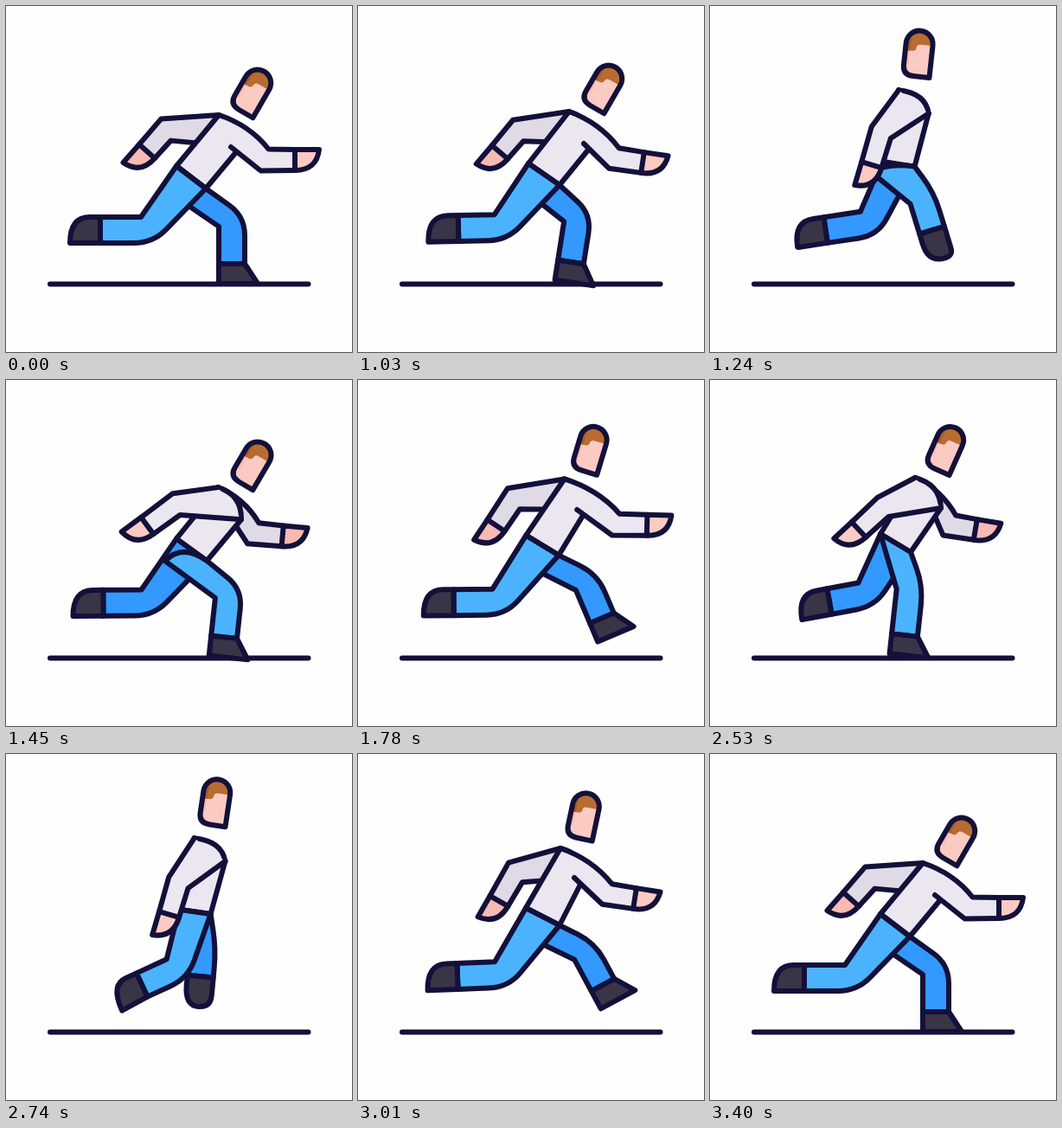
These frames come from a looping animation (400x400 px, 3430 ms). An HTML page with a canvas:

```html
<!DOCTYPE html>
<html lang="en">
<head>
<meta charset="utf-8">
<title>Runner</title>
<style>
  html, body { margin: 0; width: 100%; height: 100%; overflow: hidden; background: #fefefe; }
  canvas { display: block; width: 100%; height: 100%; }
</style>
</head>
<body>
<canvas id="stage" width="400" height="400"></canvas>
<script>
const ctx = document.getElementById('stage').getContext('2d');
const LOOP = 3430, HOLD = 1000, STEP = 30;
const INK = '#13103a', SHOE = '#3a3447';
const NEAR = { leg: '#4bb3fd', shirt: '#ebe6f0', skin: '#fbcac2' };
const FAR = { leg: '#3399fe', shirt: '#dfdae6', skin: '#f8bab2' };

// running time (ms) -> stride count, slowing down at the end
const PACE = [[0, 0], [30, .06], [450, 1.036], [1110, 2.5], [1530, 3.22], [2010, 3.7], [2160, 3.89], [2400, 4]];

// stride phase -> knee, ankle, shoe shape (1 flat, 0 trailing, -1 rounded)
const LEG = [
  [0, 261, 249, 261, 298, 1],
  [.06, 254, 245, 246, 296, 1],
  [.22, 231, 240, 225, 295, 1],
  [.5, 191, 250, 144, 262, 0],
  [.7, 166, 255, 115, 257, 0],
  [1, 163, 259, 109, 259, 0],
  [1.06, 165, 256, 116, 257, 0],
  [1.22, 181, 248, 138, 256, 0],
  [1.5, 237, 223, 242, 258, -1],
  [1.7, 262, 228, 283, 267, 1]
];

// stride phase -> elbow, wrist
const ARM = [
  [0, 299, 178, 334, 178],
  [.06, 296, 176, 329, 181],
  [.22, 286, 168, 316, 173],
  [.5, 206, 150, 201, 186],
  [.7, 189, 137, 163, 170],
  [1, 197, 143, 163, 168],
  [1.06, 197, 144, 164, 169],
  [1.22, 200, 147, 172, 173],
  [1.5, 206, 150, 201, 186],
  [1.7, 288, 162, 320, 167]
];

// stride phase -> neck, chest, waist back, waist front, head centre, head tilt
const BODY = [
  [0, 246, 126, 271, 163, 197, 185, 231, 211, 285, 99, 30],
  [.06, 244, 122, 272, 159, 197, 182, 233, 207, 284, 94, 30],
  [.22, 237, 113, 267, 148, 197, 178, 232, 199, 273, 80, 24],
  [.5, 216, 96, 252, 122, 200, 180, 237, 184, 239, 54, 6.5],
  [.7, 234, 109, 261, 143, 194, 178, 233, 198, 261, 72, 12]
];

const clamp = v => Math.max(0, Math.min(1, v));
const mix = (a, b, t) => [a[0] + (b[0] - a[0]) * t, a[1] + (b[1] - a[1]) * t];
const add = (p, v, k = 1) => [p[0] + v[0] * k, p[1] + v[1] * k];
const unit = (a, b) => {
  const x = b[0] - a[0], y = b[1] - a[1], l = Math.hypot(x, y) || 1;
  return [x / l, y / l];
};
const front = d => [d[1], -d[0]];

// smooth curve through the rows; wraps around when a period is given
function sample(rows, x, period) {
  const n = rows.length;
  if (period) x = ((x % period) + period) % period;
  const row = i => {
    if (!period) return rows[Math.max(0, Math.min(n - 1, i))];
    const turn = Math.floor(i / n), r = rows[i - turn * n];
    return [r[0] + turn * period, ...r.slice(1)];
  };
  let i = 0;
  while (i < n - 1 && rows[i + 1][0] <= x) i++;
  if (!period && i === n - 1) return rows[i].slice(1);
  const [a, b, c, d] = [row(i - 1), row(i), row(i + 1), row(i + 2)];
  const h = c[0] - b[0], s = (x - b[0]) / h, r = 1 - s;
  return b.slice(1).map((v, j) => {
    const k = j + 1;
    const m0 = (c[k] - a[k]) / (c[0] - a[0]), m1 = (d[k] - b[k]) / (d[0] - b[0]);
    return v * (1 + 2 * s) * r * r + c[k] * s * s * (3 - 2 * s) + h * (m0 * s * r * r - m1 * s * s * r);
  });
}

// path items: [x, y] is a line, [cx, cy, x, y] a curve
function trace(items, move = true) {
  items.forEach((p, i) => {
    if (p.length === 4) ctx.quadraticCurveTo(...p);
    else if (i === 0 && move) ctx.moveTo(...p);
    else ctx.lineTo(...p);
  });
}

function shape(items, fill) {
  ctx.beginPath();
  trace(items);
  ctx.closePath();
  ctx.fillStyle = fill;
  ctx.fill();
  ctx.stroke();
}

function line(items) {
  ctx.beginPath();
  trace(items);
  ctx.stroke();
}

// offset from a joint to the front side of the bend
function bend(d1, d2, w) {
  const a = front(d1), b = front(d2);
  const k = w / (1 + a[0] * b[0] + a[1] * b[1]);
  return [(a[0] + b[0]) * k, (a[1] + b[1]) * k];
}

const local = (o, d) => (x, y) => add(add(o, front(d), x), d, y);

function drawLeg(body, phase, color) {
  const [kx, ky, ax, ay, flat] = sample(LEG, phase, 2);
  const knee = [kx, ky], ankle = [ax, ay];
  const hip = mix(body.back, body.front, .5);
  const d1 = unit(hip, knee), d2 = unit(knee, ankle);
  const m = bend(d1, d2, 15), at = local(ankle, d2);
  const seat = add(add(hip, front(d1), -32), d1, -10);
  const start = mix(body.back, seat, clamp((d1[0] - .4) / .18));
  const inner = add(knee, m, -1), outer = add(knee, m);
  const above = add(outer, unit(outer, body.front), 22);
  const below = add(outer, unit(outer, at(15, 0)), 22);
  shape([
    start, inner, at(-15, 0), at(15, 0), below, [...outer, ...above], body.front,
    [...mix(body.back, body.front, .2), ...start]
  ], color);

  const f = clamp(flat), r = 14 * clamp(-flat);
  const tx = 15 + 15 * f, ty = 35 - 12 * f;
  shape([
    at(-15, 0), at(15, 0), at(tx, ty - r), [...at(tx, ty), ...at(tx - r, ty)],
    [...at(-15, ty), ...at(-15, 12 + 11 * f)]
  ], SHOE);
}

function drawArm(body, phase, look, shift) {
  const [ex, ey, wx, wy] = sample(ARM, phase, 2);
  const swing = Math.cos(phase * Math.PI);
  const elbow = [ex - shift * Math.abs(swing), ey];
  const wrist = [wx - shift * Math.max(0, swing), wy];
  const joint = mix(body.neck, body.chest, .5);
  const d1 = unit(joint, elbow), d2 = unit(elbow, wrist);
  const m = bend(d1, d2, 12.5), at = local(wrist, d2);
  const ahead = clamp((elbow[0] - joint[0]) / 20);
  const top = mix(body.chest, body.neck, ahead);
  const low = mix(body.neck, add(body.chest, [-11, 0]), ahead);
  const e1 = add(elbow, m), e2 = add(elbow, m, -1);
  const arc = add(mix(top, e1, .5), [7, -8], ahead);
  const side1 = [top, [...arc, ...e1], at(12, 0)];
  const side2 = [low, e2, at(-12, 0)];

  ctx.beginPath();
  trace(side1);
  trace([...side2].reverse(), false);
  ctx.fillStyle = look.shirt;
  ctx.fill();
  line(side1);
  line(side2);

  const s = ahead > .5 ? 12 : -12;
  shape([at(-s, 0), at(s, 0), at(s, 28), [...at(-s, 25), ...at(-s, 0)]], look.skin);
}

function drawTorso(body) {
  const bulge = add(mix(body.neck, body.chest, .5), [14, -10]);
  shape([body.back, body.neck, [...bulge, ...body.chest], body.front], NEAR.shirt);
}

function drawHead([x, y], tilt) {
  ctx.save();
  ctx.translate(x, y);
  ctx.rotate(tilt * Math.PI / 180);
  const skull = new Path2D('M15.5 26H-3Q-15.5 26-15.5 14V-11.5A15.5 15.5 0 0 1 15.5-11.5Z');
  ctx.save();
  ctx.clip(skull);
  ctx.fillStyle = '#fbcac2';
  ctx.fillRect(-20, -30, 40, 60);
  ctx.fillStyle = '#f5bdb3';
  ctx.fillRect(-16, -10, 6, 24);
  ctx.fillStyle = '#b96c30';
  ctx.fill(new Path2D('M-20-30H20V-11H2Q-3-11-3-7Q-3-3-8-3H-20Z'));
  ctx.fillStyle = '#a65d27';
  ctx.fill(new Path2D('M-20-30H-6Q-10-22-10-12V-3H-20Z'));
  ctx.restore();
  ctx.stroke(skull);
  ctx.restore();
}

function draw(time) {
  const run = Math.max(0, Math.floor((time - HOLD) / STEP) * STEP);
  const [phase] = sample(PACE, run);
  const b = sample(BODY, phase, 1);
  const body = { neck: b.slice(0, 2), chest: b.slice(2, 4), back: b.slice(4, 6), front: b.slice(6, 8) };

  ctx.fillStyle = '#fefefe';
  ctx.fillRect(0, 0, 400, 400);
  ctx.strokeStyle = INK;
  ctx.lineWidth = 6;
  ctx.lineCap = ctx.lineJoin = 'round';

  line([[51, 321.5], [349.5, 321.5]]);
  drawArm(body, phase + 1, FAR, 12);
  drawLeg(body, phase, FAR.leg);
  drawTorso(body);
  drawLeg(body, phase + 1, NEAR.leg);
  drawArm(body, phase, NEAR, 0);
  drawHead(b.slice(8, 10), b[10]);
}

const begin = performance.now();
function tick() {
  draw((performance.now() - begin) % LOOP);
  requestAnimationFrame(tick);
}
tick();
</script>
</body>
</html>
```
